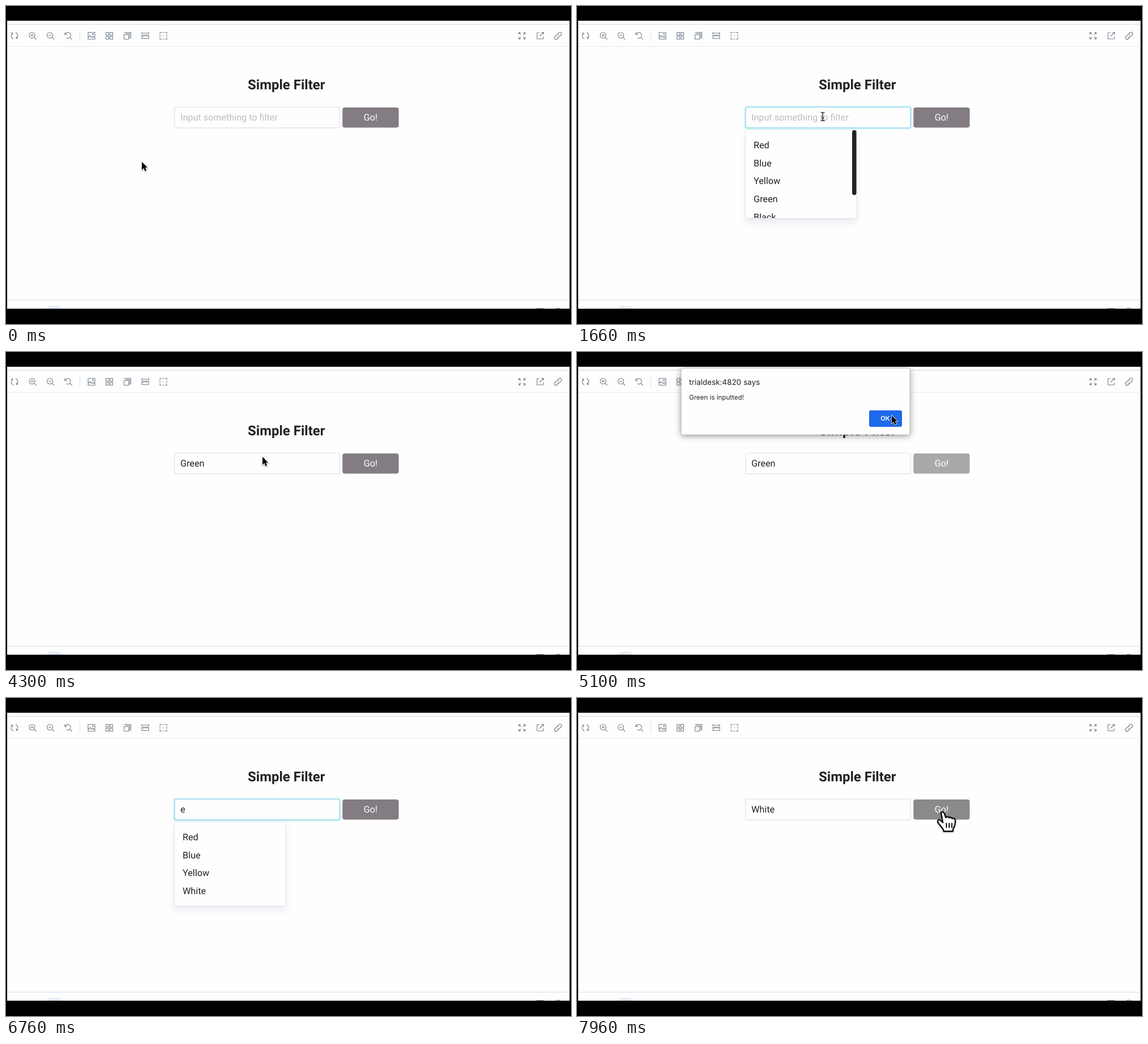
Recreate the animation shown at these times as an HTML page. Size 998 by 561 pixels, loop 8 s.

```html
<!DOCTYPE html>
<html lang="en">
<head>
<meta charset="utf-8">
<title>Simple Filter</title>
<style>
  html, body { margin: 0; width: 100%; height: 100%; overflow: hidden; background: #000; }
  svg { display: block; width: 998px; height: 561px; }
  text { font: 16.2px Roboto, sans-serif; fill: #222; text-rendering: geometricPrecision; white-space: pre; }
  #title { font-weight: 700; font-size: 24px; text-anchor: middle; }
  #hint { fill: #bdbdbd; }
  #go text { fill: #fff; text-anchor: middle; }
  #icons { fill: none; stroke: #74808b; stroke-width: 1.1; stroke-linejoin: round; }
  #panel { filter: drop-shadow(0 8px 6px rgba(70, 70, 150, .09)) drop-shadow(0 1px 1px rgba(0, 0, 0, .04)); }
  #dialog rect:first-child { filter: drop-shadow(0 2px 6px rgba(0, 0, 0, .4)); }
  #dialog text { font-family: Inter, sans-serif; }
  #arrow, #hand { filter: drop-shadow(0 1.5px 1px rgba(0, 0, 0, .4)); }
</style>
</head>
<body>
<svg viewBox="0 0 998 561">
  <defs>
    <clipPath id="page"><rect x="2" y="26" width="993.5" height="508"/></clipPath>
    <clipPath id="list"><rect id="listClip" x="298" y="219" width="196" height="155"/></clipPath>
  </defs>
  <rect width="998" height="561"/>
  <g clip-path="url(#page)">
    <rect width="998" height="561" fill="#fefefe"/>
    <path d="M2 32.2H996" stroke="#dedfe0" stroke-width="1.5"/>
    <path d="M2 71.5H996" stroke="#e4e7ea"/>
    <path d="M2 519H996" stroke="#e2e4f1" stroke-width="1.6"/>
    <rect x="70" y="529" width="30" height="20" rx="9" fill="#e3ebf8"/>
    <path d="M937 533.6H950M971 533.8Q975 531.4 979 533.8" fill="none" stroke="#74808b"/>
    <path d="M130.5 42V62" stroke="#dce1e6"/>
    <g id="icons"></g>

    <text id="title" x="495.3" y="147.3">Simple Filter</text>
    <rect id="glow" x="296.8" y="177.6" width="293.4" height="38.4" rx="4" fill="none" stroke="#9fe0f2" stroke-width="3" opacity="0"/>
    <rect id="box" x="297.7" y="178.5" width="291.6" height="36.7" rx="3" fill="#fefefe" stroke-width="1.7"/>
    <text id="hint" x="308" y="202">Input something to filter</text>
    <text id="value" x="308" y="202"></text>
    <path id="caret" d="M0 188V207" stroke="#222"/>
    <g id="go">
      <rect x="594.3" y="179" width="99.4" height="35.6" rx="4"/>
      <text x="644" y="202">Go!</text>
    </g>

    <g id="drop">
      <rect id="panel" x="297.5" y="218.5" width="196.7" rx="2.5" fill="#fefefe" stroke="#e6e6e8"/>
      <g id="rows" clip-path="url(#list)"></g>
      <rect id="thumb" x="486" y="219" width="7.5" rx="3.75" fill="#222"/>
    </g>
  </g>

  <g id="dialog">
    <rect x="184" y="28.5" width="404" height="117.5" rx="3.5" fill="#fefefe" stroke="#aaa" stroke-width=".6"/>
    <text x="198" y="57.6" style="font-size:13.5px">trialdesk:4820 says</text>
    <text x="198" y="83.6" style="font-size:11.6px">Green is inputted!</text>
    <rect id="ok" x="516" y="103" width="58" height="29" rx="3"/>
    <text x="544.5" y="121.2" text-anchor="middle" style="font-size:11.2px;font-weight:600;fill:#fff">OK</text>
  </g>

  <g id="pointer">
    <path id="arrow" d="M0 0V14L3.2 11L5.5 16.2L8 15.1L5.7 10.1H10Z" stroke="#fff" stroke-width="1.6" paint-order="stroke"/>
    <g id="ibeam" fill="none">
      <path id="bar" d="M-3.5 -7.6Q0 -7.6 0 -5.4Q0 -7.6 3.5 -7.6M0 -5.4V5.4M-3.5 7.6Q0 7.6 0 5.4Q0 7.6 3.5 7.6M-2 2.2H2" stroke="#333" stroke-width="1.5"/>
    </g>
    <g id="hand" transform="translate(-9 -1)" stroke="#000" stroke-width="2.2" stroke-linejoin="round" stroke-linecap="round">
      <path fill="#fff" d="M8.3 5C7.6 1.6 12 .9 13.3 3.8L16.6 12C17.6 9.8 21 10 22 12.4C23.4 10.7 26.7 11.4 27.5 13.8C29.5 12.4 32.7 13.6 33 16.4C33.5 21 33 24.5 31.3 28L29.4 32L29 36.2H12.8L12.3 33.5C10 29.5 6.2 26 3 21.2C.6 17.6 3.8 14.6 6.8 16.7L11.3 20.8Z"/>
      <path fill="none" stroke-width="2" stroke-linecap="butt" d="M17.6 21.5V30M22.4 21.5V30M27.2 21.5V30"/>
    </g>
  </g>
</svg>
<script>
const LOOP = 8000, PITCH = 31.75, BLINK = 250;
const COLORS = ['Red', 'Blue', 'Yellow', 'Green', 'Black', 'White'];
const $ = id => document.getElementById(id);
const set = (id, attrs) => { for (const k in attrs) $(id).setAttribute(k, attrs[k]); };
const show = (id, on) => { $(id).style.display = on ? '' : 'none'; };
const ramp = (t, a, b) => Math.min(1, Math.max(0, (t - a) / (b - a)));

// toolbar icons, drawn around their centre
const lens = 'M4 -1A5 5 0 1 1 -6 -1A5 5 0 1 1 4 -1ZM2.6 2.6L6.5 6.5M-3.5 -1H1.5';
const frame = 'M-6 -6H6V6H-6Z';
const icons = [
  [15, 'M-2 5.4A5.6 5.6 0 0 1 -3.4 -4.4M2 -5.4A5.6 5.6 0 0 1 3.4 4.4M-6.2 -4.7H-3.2V-1.7M6.2 4.7H3.2V1.7'],
  [47, lens + 'M-1 -3.5V1.5'],
  [78.5, lens],
  [110, 'M-6 -6V-2H-2M-5.7 -2.2A5 5 0 1 1 -3.5 3.4M2.6 2.6L6.5 6.5'],
  [151, frame + 'M-6 3L-2.5 -.5L1 3L3 1L6 4M3.6 -2.8A1 1 0 1 1 1.6 -2.8A1 1 0 1 1 3.6 -2.8'],
  [182.5, 'M-6 -6H-1V-1H-6ZM1 -6H6V-1H1ZM-6 1H-1V6H-6ZM1 1H6V6H1Z'],
  [214.5, 'M-6 -2H2V6H-6ZM-4 -4H4V5M-6 -6H6V5'],
  [246, 'M-6 -1H6V5H-6ZM-3.5 -1V2M-1 -1V1M1.5 -1V2M4 -1V1M-6 -4.5H6M-6 -6.5V-2.5M6 -6.5V-2.5'],
  [278, 'M-6 -3V-6H-3M-1.5 -6H1.5M3 -6H6V-3M6 -1.5V1.5M6 3V6H3M1.5 6H-1.5M-3 6H-6V3M-6 1.5V-1.5M-.6 0H.6'],
  [911.5, 'M-2 -2L-5.6 -5.6M-5.6 -2.6V-5.6H-2.6M2 -2L5.6 -5.6M5.6 -2.6V-5.6H2.6M-2 2L-5.6 5.6M-5.6 2.6V5.6H-2.6M2 2L5.6 5.6M5.6 2.6V5.6H2.6'],
  [943.5, 'M-1 -5.5H-5.5V5.5H5.5V1M2 -6H6V-2M6 -6L-1 1'],
  [975, 'M-1 -3L1.5 -5.5A2.8 2.8 0 0 1 5.5 -1.5L2.5 1.5A2.8 2.8 0 0 1 -1 1.7M1 3L-1.5 5.5A2.8 2.8 0 0 1 -5.5 1.5L-2.5 -1.5A2.8 2.8 0 0 1 1 -1.7']
];
$('icons').innerHTML = icons.map(([x, d]) => `<path transform="translate(${x} 52.5)" d="${d}"/>`).join('');
$('rows').innerHTML = COLORS.map((c, i) => `<text x="312" y="${250.9 + i * PITCH}"></text>`).join('');
const rows = [...$('rows').children];

const path = [
  [300, 240, 275], [430, 183, 293], [570, 183, 293], [660, 48, 201],
  [870, 48, 201], [960, 434, 195], [1670, 434, 195], [1800, 435, 193],
  [2400, 435, 193], [2500, 434, 195], [3470, 434, 195], [3600, 446, 266],
  [3660, 446, 266], [3760, 446, 234], [4270, 446, 234], [4300, 452, 185],
  [4400, 565, 190], [4500, 684, 212], [4600, 655, 205], [4830, 655, 205],
  [5060, 556, 112], [5230, 556, 112], [5500, 434, 207], [5570, 434, 196],
  [7000, 434, 196], [7100, 463, 262], [7330, 439, 343], [7700, 439, 343],
  [7960, 644, 200]
];
const pointers = [
  [0, 'arrow'], [950, 'ibeam'], [2330, ''], [3000, 'ibeam'], [3540, 'hand'],
  [3690, 'arrow'], [4460, 'hand'], [4860, 'arrow'], [5330, 'hand'], [5530, 'ibeam'],
  [6060, ''], [7030, 'ibeam'], [7060, 'hand'], [7770, 'arrow'], [7900, 'hand']
];
const typed = [
  [0, ''], [2495, 'r'], [3660, 'Green'], [6060, 'Gree'], [6130, 'Gre'],
  [6200, 'Gr'], [6260, 'G'], [6330, ''], [6495, 'e'], [7500, 'White']
];
const focus = [[1350, 3660], [5575, 7500]];
const rest = [131, 125, 131], hover = [169, 169, 171];
const tints = [
  [4450, ...rest], [4680, ...hover], [5260, ...hover], [5500, 130, 130, 124],
  [5600, ...rest], [7900, ...rest], [7960, 138, 138, 140]
];

const latest = (list, t) => list.filter(k => k[0] <= t).pop();
function tween(keys, t) {
  const i = keys.findIndex(k => k[0] > t);
  if (i < 0) return keys[keys.length - 1].slice(1);
  if (!i) return keys[0].slice(1);
  const a = keys[i - 1], b = keys[i], p = ramp(t, a[0], b[0]);
  return a.slice(1).map((v, j) => v + (b[j + 1] - v) * p);
}
const mix = (a, b, p) => `rgb(${a.map((v, i) => Math.round(v + (b[i] - v) * p))})`;

function drawList(words, open) {
  show('drop', open && words.length);
  const full = 22 + words.length * PITCH, height = Math.min(156.5, full);
  rows.forEach((r, i) => { r.textContent = words[i] || ''; });
  set('panel', { height: height - .5 });
  set('listClip', { height: height - 1.5 });
  set('thumb', { height: (height - 1) * height / full });
  show('thumb', full > height);
}

function draw(t) {
  const [since, text] = latest(typed, t);
  const field = focus.find(([a, b]) => t >= a && t < b);
  const lit = Math.max(...focus.map(([a, b]) => ramp(t, a, a + 100) * (1 - ramp(t, b, b + 70))));
  set('box', { stroke: mix([231, 231, 231], [157, 220, 237], lit) });
  set('glow', { opacity: lit * .4 });

  show('hint', !text);
  $('value').textContent = text;
  const width = text ? $('value').getComputedTextLength() : 0;
  set('caret', { transform: `translate(${308.5 + width} 0)` });
  show('caret', field && Math.floor((t - Math.max(field[0], since)) / BLINK) % 2 === 0);

  const chosen = t >= 3660 ? 'Green' : '';
  drawList(COLORS.filter(c => c !== chosen && c.toLowerCase().includes(text.toLowerCase())), field);

  $('go').firstElementChild.setAttribute('fill', mix(tween(tints, t), rest, 0));

  const alpha = ramp(t, 4700, 4800) * (1 - ramp(t, 5170, 5270));
  show('dialog', alpha > 0);
  set('dialog', { opacity: alpha });
  set('ok', { fill: t > 5125 ? '#1b5fd6' : '#1f69eb' });

  const kind = latest(pointers, t)[1];
  for (const id of ['arrow', 'ibeam', 'hand']) show(id, id === kind);
  set('pointer', { transform: `translate(${tween(path, t)})` });
}

const start = performance.now();
function tick() {
  draw((performance.now() - start) % LOOP);
  requestAnimationFrame(tick);
}
draw(0);
tick();
</script>
</body>
</html>
```
